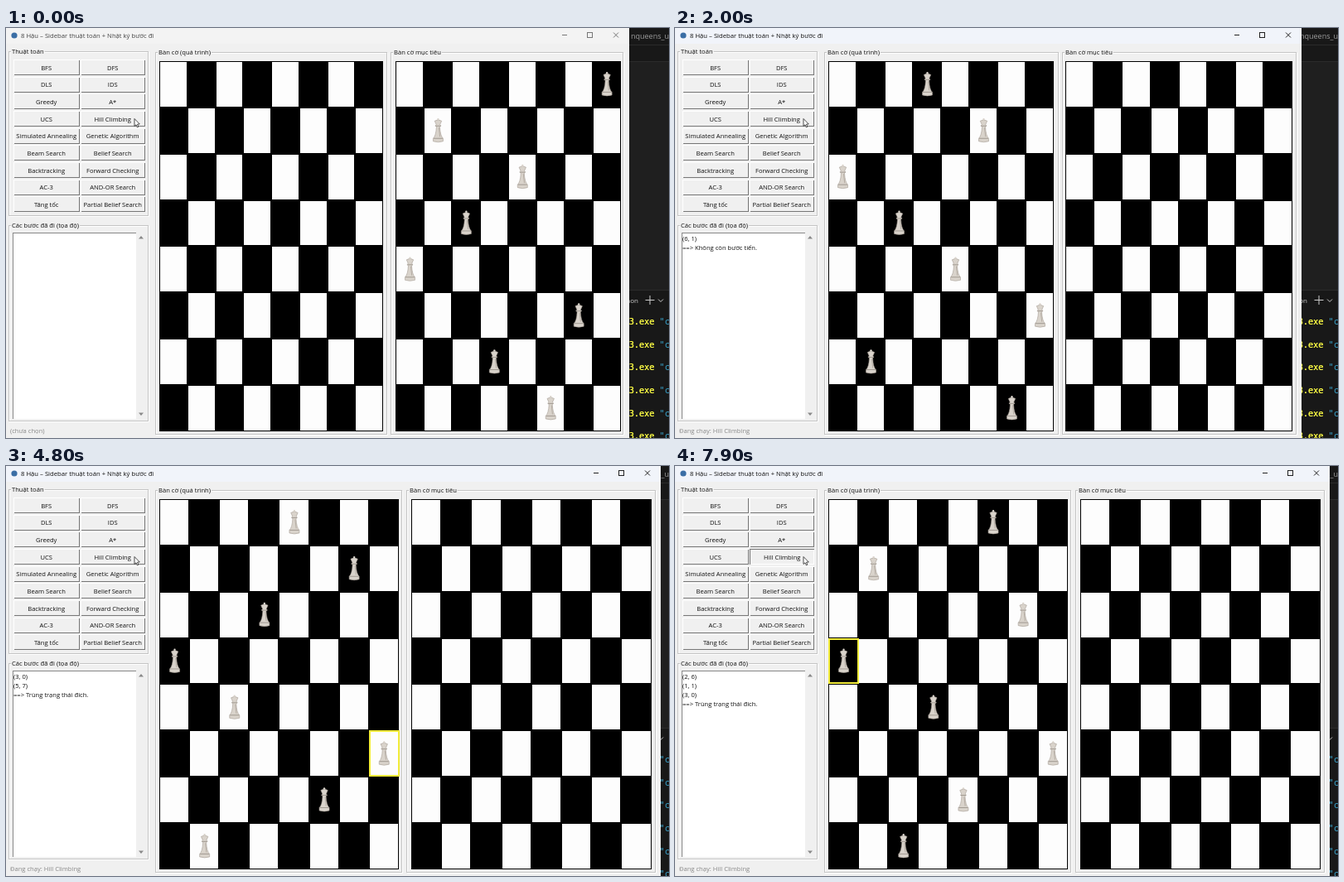
Animation, 800 px wide and 495 px high, one loop 8 s. Source, as an HTML page with a canvas:

```html
<!DOCTYPE html>
<html lang="vi">
<head>
<meta charset="utf-8">
<style>
html, body { margin: 0; width: 800px; height: 495px; overflow: hidden; background: #1f1f1f; }
canvas { display: block; }
</style>
</head>
<body>
<canvas id="stage" width="800" height="495"></canvas>
<script>
const g = document.getElementById('stage').getContext('2d');
const LOOP = 8000, STEP = 100, TOP = 40, ROW = 55.85;
const FACE = '#f0f0f0', UI = '"Open Sans", "Noto Sans", sans-serif';
const BUTTONS = ['BFS', 'DFS', 'DLS', 'IDS', 'Greedy', 'A*', 'UCS', 'Hill Climbing',
  'Simulated Annealing', 'Genetic Algorithm', 'Beam Search', 'Belief Search',
  'Backtracking', 'Forward Checking', 'AC-3', 'AND-OR Search', 'Tăng tốc', 'Partial Belief Search'];

// Per window width: both boards as [left, column width], then the group frame edges.
const LAYOUT = {
  752: { left: [185, 33.75], right: [470, 33.95], frames: [460, 464, 745] },
  756: { left: [185, 34], right: [471, 34.2], frames: [463, 467, 750] },
  790: { left: [185, 36.1], right: [489, 36.2], frames: [478, 483, 784] }
};
const STUCK = '==> Không còn bước tiến.', DONE = '==> Trùng trạng thái đích.';

// Each entry changes the state from the given step onward; queens hold one column per row.
const TIMELINE = [
  [0, { win: 752, queens: '', goal: '71420635', log: [], status: '(chưa chọn)', mark: null, down: false, paint: '' }],
  [1, { down: true }],
  [2, { down: false, goal: '', status: 'Đang chạy: Hill Climbing', queens: '35024756' }],
  [4, { log: ['(6, 1)'], mark: [6, 1], queens: '350247-6' }],
  [5, { queens: '35024716' }],
  [6, { log: ['(6, 1)', STUCK], mark: null }],
  [7, { win: 790, paint: 'grow' }],
  [8, { paint: '' }],
  [9, { win: 756, paint: 'shrink' }],
  [12, { paint: '' }],
  [26, { down: true }],
  [27, { down: false, log: [], queens: '46322451' }],
  [28, { log: ['(3, 0)'], mark: [3, 0], queens: '-------6' }],
  [30, { queens: '46302451' }],
  [32, { log: ['(3, 0)', '(5, 7)'], mark: [5, 7], queens: '46302751' }],
  [33, { win: 790, log: ['(3, 0)', '(5, 7)', DONE] }],
  [53, { down: true }],
  [54, { down: false, log: [], mark: null, queens: '25631340' }],
  [57, { log: ['(2, 7)'], mark: [2, 7], queens: '25731340' }],
  [59, { log: ['(2, 7)', '(5, 6)'], mark: [5, 6], queens: '25-31-4-' }],
  [61, { queens: '25731640' }],
  [63, { log: ['(2, 7)', '(5, 6)', DONE] }],
  [69, { down: true }],
  [70, { down: false, log: [], mark: null, queens: '53243742' }],
  [72, { log: ['(2, 6)'], mark: [2, 6], queens: '53643742' }],
  [74, { log: ['(2, 6)', '(1, 1)'], mark: [1, 1], queens: '51643742' }],
  [76, { log: ['(2, 6)', '(1, 1)', '(3, 0)'], mark: [3, 0], queens: '51603742' }],
  [77, { log: ['(2, 6)', '(1, 1)', '(3, 0)', DONE] }],
  [79, { down: true }]
];

function box(x, y, w, h, color) {
  g.fillStyle = color;
  g.fillRect(x, y, w, h);
}

function outline(x, y, w, h, color, width = 1) {
  g.strokeStyle = color;
  g.lineWidth = width;
  g.strokeRect(x, y, w, h);
}

function line(points, color, width = 1) {
  g.strokeStyle = color;
  g.lineWidth = width;
  g.beginPath();
  points.forEach(([x, y]) => g.lineTo(x, y));
  g.stroke();
}

function text(s, x, y, color = '#111', size = 7.6, align = 'left', font = UI) {
  g.font = `${size}px ${font}`;
  g.textAlign = align;
  g.fillStyle = color;
  g.fillText(s, x, y + size * 0.36);
}

function group(label, x, y, right, bottom) {
  outline(x + 1.5, y + 1.5, right - x - 1, bottom - y - 1, '#fff');
  outline(x + 0.5, y + 0.5, right - x - 1, bottom - y - 1, '#c4c4c4');
  g.font = `7.6px ${UI}`;
  box(x + 3, y - 2, g.measureText(label).width + 2, 6, FACE);
  text(label, x + 4, y + 0.5);
}

function bevel(x, y, w, h, pressed) {
  box(x, y, w, h, pressed ? '#777' : '#fff');
  box(x + 1, y + 1, w - 1, h - 1, pressed ? '#fff' : '#777');
  box(x + 1, y + 1, w - 2, h - 2, FACE);
}

function queen(x, y) {
  g.save();
  g.translate(x, y);
  g.fillStyle = '#d9d3cb';
  g.strokeStyle = '#a69e95';
  g.lineWidth = 0.6;
  g.beginPath();
  g.moveTo(-6, 13.5);
  g.lineTo(-6, 10);
  g.quadraticCurveTo(-2.6, 7, -2, -4);
  g.lineTo(-3.6, -5.2);
  g.lineTo(-2.2, -6.5);
  g.lineTo(-4.2, -11);
  g.quadraticCurveTo(0, -14, 4.2, -11);
  g.lineTo(2.2, -6.5);
  g.lineTo(3.6, -5.2);
  g.lineTo(2, -4);
  g.quadraticCurveTo(2.6, 7, 6, 10);
  g.lineTo(6, 13.5);
  g.quadraticCurveTo(0, 15.5, -6, 13.5);
  g.fill();
  g.stroke();
  g.beginPath();
  g.arc(0, -13.2, 1.2, 0, 7);
  g.fill();
  line([[-5.5, 10], [5.5, 10]], '#948c83', 0.8);
  line([[-3, -5], [3, -5]], '#948c83', 0.8);
  line([[1, -3], [2.2, 8]], '#b5ada4', 1);
  g.restore();
}

function board([x, col], queens, mark, halo) {
  const cx = c => Math.round(x + c * col), cy = r => Math.round(TOP + r * ROW);
  box(x, TOP, Math.round(col * 8), 447, '#000');
  for (let r = 0; r < 8; r++) {
    for (let c = r % 2; c < 8; c += 2) {
      box(cx(c) + 1, cy(r) + 1, cx(c + 1) - cx(c) - 2, cy(r + 1) - cy(r) - 2, '#fdfdfd');
    }
  }
  [...queens].forEach((c, r) => {
    if (c === '-') return;
    const mx = x + (+c + 0.5) * col + 0.5, my = TOP + (r + 0.5) * ROW - 0.5;
    if (halo && (r + +c) % 2 === 0) box(Math.round(mx - 16), Math.round(my - 16), 33, 32, '#fdfdfd');
    queen(mx, my);
  });
  if (mark) {
    const [r, c] = mark;
    outline(cx(c) + 1, cy(r) + 1, cx(c + 1) - cx(c) - 1, cy(r + 1) - cy(r) - 2, '#f2ec3a', 2);
  }
}

function editor() {
  box(740, 0, 60, 495, '#1f1f1f');
  box(740, 0, 60, 40, '#181818');
  box(740, 20, 60, 1, '#2b2b2b');
  box(740, 40, 60, 1, '#2b2b2b');
  box(740, 316, 60, 179, '#181818');
  box(740, 316, 60, 1, '#2b2b2b');
  text('nqueens_u', 754, 10, '#9d9d9d', 9);
  text('hon', 763, 329, '#ccc', 8, 'right');
  line([[771.5, 328.5], [782.5, 328.5]], '#ccc');
  line([[777, 323], [777, 334]], '#ccc');
  line([[787, 327.5], [790, 330.5], [793, 327.5]], '#ccc');
  for (let i = 0; i < 6; i++) {
    const y = 354.5 + i * 27.6, mono = '"DejaVu Sans Mono", monospace';
    g.font = '10px monospace';
    text('3.exe', 751.5, y, '#f5f543', 10.2, 'left', mono.replace(/^/, ''));
    text('3.exe', 751.9, y, '#f5f543', 10.2, 'left', mono);
    text('"c', 788.5, y, '#3aa6d0', 10.2, 'left', mono);
  }
}

function titleBar(win, active) {
  const ink = active ? '#222' : '#777';
  box(0, 0, win, 19, active ? '#f1f4fa' : '#f3f3f3');
  g.fillStyle = '#3b6ea5';
  g.beginPath();
  g.arc(10, 9, 3.6, 0, 7);
  g.fill();
  text('8 Hậu – Sidebar thuật toán + Nhật ký bước đi', 18, 9, active ? '#111' : '#444', 7.7);
  line([[win - 81, 8.5], [win - 75, 8.5]], ink);
  outline(win - 50.5, 5.5, 6, 6, ink);
  line([[win - 19, 5.5], [win - 13, 11.5]], ink);
  line([[win - 13, 5.5], [win - 19, 11.5]], ink);
}

function sidebar(s) {
  group('Thuật toán', 3, 28, 172, 227);
  BUTTONS.forEach((name, i) => {
    const right = i % 2, y = 48 + (i >> 1) * 20.65, pressed = s.down && i === 7;
    bevel(right ? 90 : 9, Math.round(y) - 10, right ? 78 : 80, 19, pressed);
    text(name, (right ? 128.7 : 48.7) + pressed * 0.6, y + pressed * 0.6, '#111', 7.6, 'center');
  });
  group('Các bước đã đi (tọa độ)', 3, 238, 172, 475);
  box(8, 247, 150, 225, '#888');
  box(9, 248, 149, 224, '#fff');
  box(157, 247, 11, 225, FACE);
  s.log.forEach((entry, i) => text(entry, 9, 254 + i * 11.1));
  g.fillStyle = '#888';
  for (const [y, d] of [[253, -1], [466, 1]]) {
    g.beginPath();
    g.moveTo(160, y - d * 1.5);
    g.lineTo(166, y - d * 1.5);
    g.lineTo(163, y + d * 2);
    g.fill();
  }
  text(s.status, 5, 486.5, '#888');
}

function boards(s) {
  const { left, right, frames: [end, start, far] } = LAYOUT[s.win];
  group('Bàn cờ (quá trình)', 180, 29, end, 491);
  group('Bàn cờ mục tiêu', start, 29, far, 491);
  if (s.paint === 'grow') {
    // Contents still at the old size inside the widened frames.
    board(LAYOUT[752].left, s.queens);
    g.save();
    g.beginPath();
    g.rect(488, TOP, 254, 447);
    g.clip();
    board(LAYOUT[752].right, '');
    g.restore();
    box(745, TOP, 1, 450, '#c4c4c4');
    box(751, TOP, 29, 447, '#fdfdfd');
    box(756, TOP, 4, 447, '#000');
    return;
  }
  if (s.paint === 'shrink') {
    g.save();
    g.beginPath();
    g.rect(740, TOP, 11, 447);
    g.clip();
    board(LAYOUT[790].right, '');
    g.restore();
  }
  board(left, s.queens, s.mark, s.paint === 'shrink');
  board(right, s.goal);
}

function pointer() {
  g.beginPath();
  [[155, 109.5], [155, 118.5], [157, 116.8], [158.4, 119.8], [159.8, 119.2], [158.5, 116.2], [161.3, 116]]
    .forEach(([x, y]) => g.lineTo(x, y));
  g.closePath();
  g.fillStyle = '#fff';
  g.fill();
  g.strokeStyle = '#222';
  g.lineWidth = 0.8;
  g.stroke();
}

function draw(ms) {
  const step = Math.floor(ms / STEP), s = {};
  for (const [from, change] of TIMELINE) if (from <= step) Object.assign(s, change);
  editor();
  box(0, 0, s.win, 495, FACE);
  titleBar(s.win, step > 0);
  sidebar(s);
  boards(s);
  pointer();
}

const begin = performance.now();
function tick() {
  draw((performance.now() - begin) % LOOP);
  requestAnimationFrame(tick);
}
tick();
</script>
</body>
</html>
```
